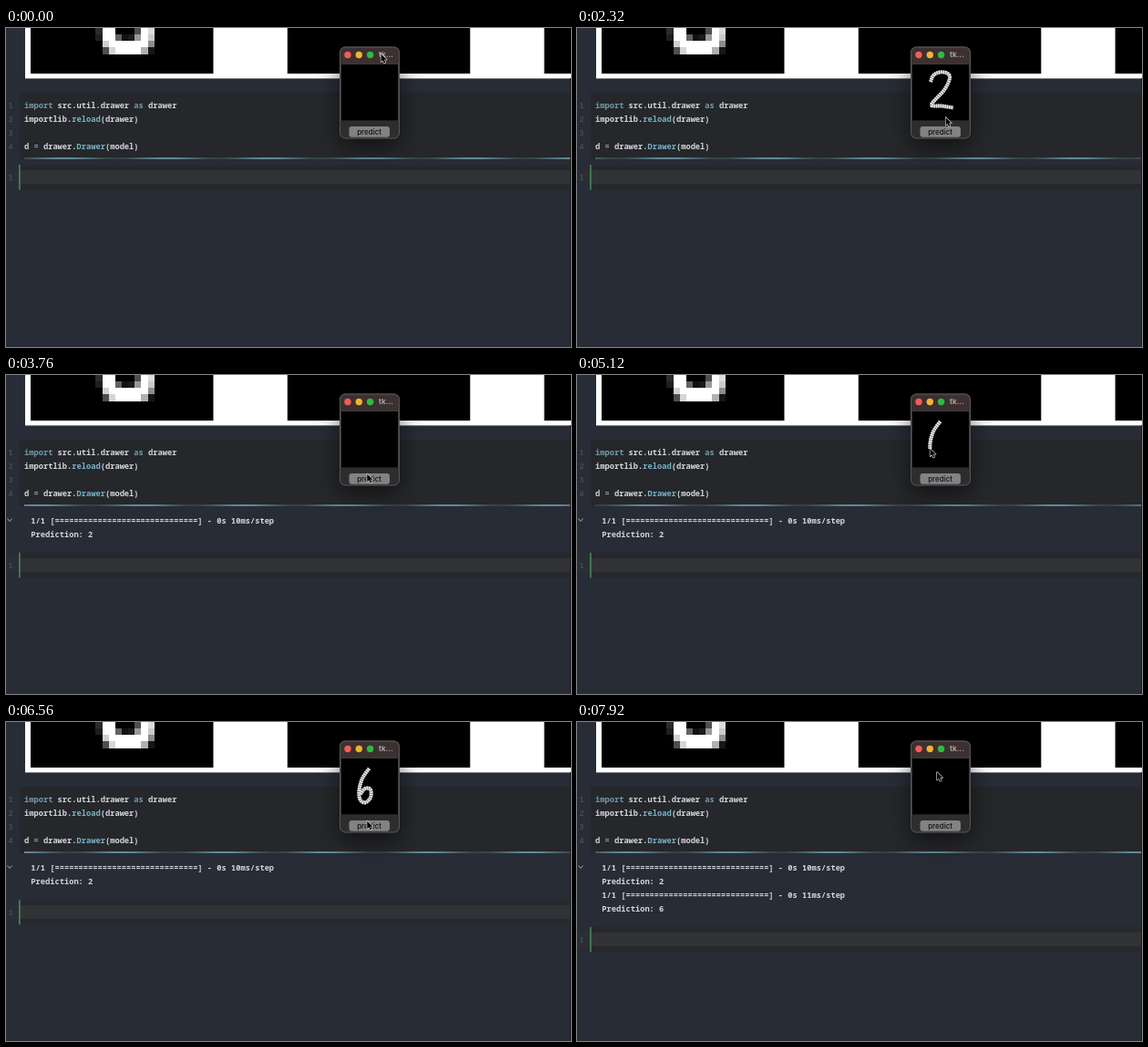
An HTML page with a canvas that plays this animation: 620 px wide and 350 px high, repeating every 8 s.

```html
<!DOCTYPE html>
<html lang="en">
<head>
<meta charset="utf-8">
<title>Notebook digit drawer</title>
<style>
  html, body { margin: 0; width: 100%; height: 100%; overflow: hidden; background: #282c36; }
  canvas { display: block; width: 620px; height: 350px; }
</style>
</head>
<body>
<canvas id="stage" width="620" height="350"></canvas>
<script>
const ctx = document.getElementById('stage').getContext('2d');
const LOOP = 8000, STEP = 80, LINE = 15, CHAR = 5.232;
const MONO = '600 8.72px "Noto Sans Mono", "DejaVu Sans Mono", monospace';
const PLAIN = '#d3d6dc', KEYWORD = '#7399ad', CALL = '#78b2c7', DIM = '#454b54';
const COLORS = { import: KEYWORD, as: KEYWORD, reload: CALL, Drawer: CALL, '=': '#8a98a5' };
const CODE = ['import src.util.drawer as drawer', 'importlib.reload(drawer)', '', 'd = drawer.Drawer(model)'];

const TITLE = [411.5, 28.5], BUTTON = [396.3, 108.5], HOME = [395, 55];

// Each digit is drawn from start to end, then predicted and cleared
const DIGITS = [
  { value: 2, ms: 10, start: 1040, end: 2160, clear: 3040, path: curve([[388, 59], [391, 52], [398, 48.5],
    [406, 49.5], [409, 55], [403, 68], [389, 84], [400, 85.5], [413, 87.5]]) },
  { value: 6, ms: 11, start: 4640, end: 5760, clear: 7120, path: curve([[398.5, 51], [391, 62], [387.5, 75],
    [388.5, 85], [394, 88.5], [400, 83], [400, 74], [394, 73], [389, 79]]) }
];

const OUTPUT = DIGITS.flatMap(d => [
  { time: d.clear - STEP, str: `1/1 [${'='.repeat(30)}] - 0s ${d.ms}ms/step` },
  { time: d.clear, str: `Prediction: ${d.value}` }
]);

// Cursor legs between the strokes
const LEGS = [];
const leg = (from, to, arrive, time) => LEGS.push({ from, to, start: arrive - time, end: arrive });
let rest = TITLE;
for (const d of DIGITS) {
  leg(rest, d.path[0], d.start - 160, 640);
  leg(d.path[d.path.length - 1], BUTTON, d.end + 320, 320);
  rest = BUTTON;
}
leg(rest, HOME, 7840, 640);

// Catmull-Rom curve through the points
function curve(pts) {
  const out = [pts[0]];
  const at = i => pts[Math.max(0, Math.min(pts.length - 1, i))];
  for (let i = 0; i < pts.length - 1; i++) {
    const [a, b, c, d] = [at(i - 1), at(i), at(i + 1), at(i + 2)];
    for (let k = 1; k <= 8; k++) {
      const u = k / 8;
      out.push([0, 1].map(n => 0.5 * (2 * b[n] + (c[n] - a[n]) * u +
        (2 * a[n] - 5 * b[n] + 4 * c[n] - d[n]) * u * u +
        (3 * b[n] - a[n] - 3 * c[n] + d[n]) * u * u * u)));
    }
  }
  return out;
}

const mix = (a, b, u) => a.map((v, i) => v + (b[i] - v) * u);
const clamp = v => Math.max(0, Math.min(1, v));
const dist = (a, b) => Math.hypot(b[0] - a[0], b[1] - a[1]);

// The part of a digit drawn so far, at constant speed
function trace({ path, start, end }, t) {
  const total = path.reduce((sum, p, i) => sum + (i ? dist(path[i - 1], p) : 0), 0);
  let left = total * clamp((t - start) / (end - start));
  const done = [path[0]];
  for (let i = 1; i < path.length && left > 0; i++) {
    const len = dist(path[i - 1], path[i]);
    done.push(mix(path[i - 1], path[i], Math.min(1, left / len)));
    left -= len;
  }
  return done;
}

function cursorAt(t) {
  const d = DIGITS.find(d => t >= d.start && t <= d.end);
  if (d) return trace(d, t).pop();
  const l = LEGS.filter(l => t >= l.start).pop() || LEGS[0];
  const u = clamp((t - l.start) / (l.end - l.start));
  return mix(l.from, l.to, u * u * (3 - 2 * u));
}

function rect(x, y, w, h, color) {
  ctx.fillStyle = color;
  ctx.fillRect(x, y, w, h);
}

function round(x, y, w, h, r, color) {
  ctx.beginPath();
  ctx.roundRect(x, y, w, h, r);
  ctx.fillStyle = color;
  ctx.fill();
}

function text(str, x, y, color, font = MONO, align = 'left') {
  ctx.font = font;
  ctx.textAlign = align;
  ctx.fillStyle = color;
  ctx.fillText(str, x, y);
}

// Bottom bowl of a pixelated digit, shaded by distance from a rounded arc
function drawBowl() {
  const size = 200 / 28;
  const edge = i => Math.round(27 + i * size);
  for (let j = 0; j < 4; j++) {
    const y = Math.round(j * size), h = Math.round((j + 1) * size) - y;
    for (let i = 10; i < 20; i++) {
      const dx = Math.abs(27 + (i + 0.5) * size - 133) / 21;
      const dy = (j + 0.5) * size / 22;
      const off = Math.abs(Math.cbrt(dx ** 3 + dy ** 3) - 1) * 21;
      const v = 255 * clamp(1.6 - off / 7);
      rect(edge(i), y, edge(i + 1) - edge(i), h, `rgb(${v},${v},${v})`);
    }
  }
}

function drawPlots() {
  rect(21, 0, 599, 55.4, '#fff');
  for (let i = 0; i < 3; i++) rect(27 + i * 281.8, 0, 200.5, 50, '#000');
  drawBowl();
}

function drawCode() {
  rect(15, 71, 605, 73, '#25272a');
  CODE.forEach((line, i) => {
    const y = 88 + i * LINE;
    text(i + 1, 2.5, y, DIM);
    let x = 20;
    for (const part of line.split(/\b/)) {
      text(part, x, y, COLORS[part.trim()] || PLAIN);
      x += part.length * CHAR;
    }
  });
}

function drawProgress(t) {
  const g = ctx.createLinearGradient(20, 0, 620, 0);
  for (let i = 0; i <= 60; i++) {
    const k = 0.5 + 0.5 * Math.cos(2 * Math.PI * (i * 10 / 112 - 0.4 - t / 1000));
    g.addColorStop(i / 60, `rgba(124,184,200,${0.25 + 0.75 * k})`);
  }
  rect(20, 142.3, 600, 1.4, g);
}

function drawOutput(t) {
  const lines = OUTPUT.filter(o => t >= o.time);
  lines.forEach((o, i) => text(o.str, 27.3, 163 + i * LINE, PLAIN));
  if (lines.length) {
    ctx.beginPath();
    ctx.moveTo(1.5, 157.5);
    ctx.lineTo(4, 160.5);
    ctx.lineTo(6.5, 157.5);
    ctx.strokeStyle = '#a3a8b0';
    ctx.lineWidth = 1;
    ctx.stroke();
  }
  const y = lines.length ? 165 + lines.length * LINE : 150;
  rect(15, y, 605, 27.5, '#26282b');
  rect(0, y + 6, 14, 15, '#2b2e36');
  rect(15, y + 6, 605, 15, '#313236');
  rect(14.2, y, 1.4, 27.5, '#559260');
  text('1', 2.5, y + 17, '#3e4f48');
}

function drawWindow() {
  ctx.save();
  ctx.shadowColor = 'rgba(0,0,0,.55)';
  ctx.shadowBlur = 26;
  ctx.shadowOffsetY = 9;
  round(366, 20.5, 66, 101, 6, '#2d2d2e');
  ctx.restore();
  round(366, 20.5, 66, 18.5, [6, 6, 0, 0], '#3c3030');
  rect(367, 39, 64, 63, '#3a3a3b');
  rect(368, 40, 62, 61.5, '#000');
  ctx.beginPath();
  ctx.roundRect(366.5, 21, 65, 100, 6);
  ctx.strokeStyle = '#626063';
  ctx.lineWidth = 0.8;
  ctx.stroke();
  ['#ed5f55', '#f0b232', '#2dbb42'].forEach((c, i) => round(371.3 + i * 12.3, 25.8, 7.4, 7.4, 3.7, c));
  text('tk...', 409, 32, '#aaa2a1', '700 8.2px Inter, sans-serif');
  round(376.5, 108, 44.5, 11.7, 3, '#828283');
  text('predict', 398.6, 117, '#111', '500 8px Inter, sans-serif', 'center');
}

function drawDigit(t) {
  const d = DIGITS.find(d => t > d.start && t < d.clear);
  if (!d) return;
  ctx.save();
  ctx.beginPath();
  trace(d, t).forEach(p => ctx.lineTo(...p));
  ctx.lineWidth = 3.9;
  ctx.strokeStyle = '#787878';
  ctx.stroke();
  ctx.setLineDash([1.5, 0.9]);
  ctx.strokeStyle = '#f2f2f2';
  ctx.stroke();
  ctx.restore();
}

function drawCursor([x, y]) {
  ctx.save();
  ctx.translate(x, y);
  ctx.beginPath();
  [[0, 0], [0, 8.7], [2, 6.9], [3.4, 10], [4.9, 9.4], [3.6, 6.3], [6.3, 6.2]].forEach(p => ctx.lineTo(...p));
  ctx.closePath();
  ctx.lineJoin = 'round';
  ctx.lineWidth = 1.2;
  ctx.strokeStyle = '#e6e6e6';
  ctx.stroke();
  ctx.fillStyle = '#050505';
  ctx.fill();
  ctx.restore();
}

function render(t) {
  rect(0, 0, 620, 350, '#282c36');
  drawPlots();
  drawCode();
  drawProgress(t);
  drawOutput(t);
  rect(619, 55, 1, 295, '#1c1f25');
  drawWindow();
  drawDigit(t);
  drawCursor(cursorAt(t));
}

const begin = performance.now();
function tick() {
  const t = (performance.now() - begin) % LOOP;
  render(Math.floor(t / STEP) * STEP);
  requestAnimationFrame(tick);
}
tick();
</script>
</body>
</html>
```
